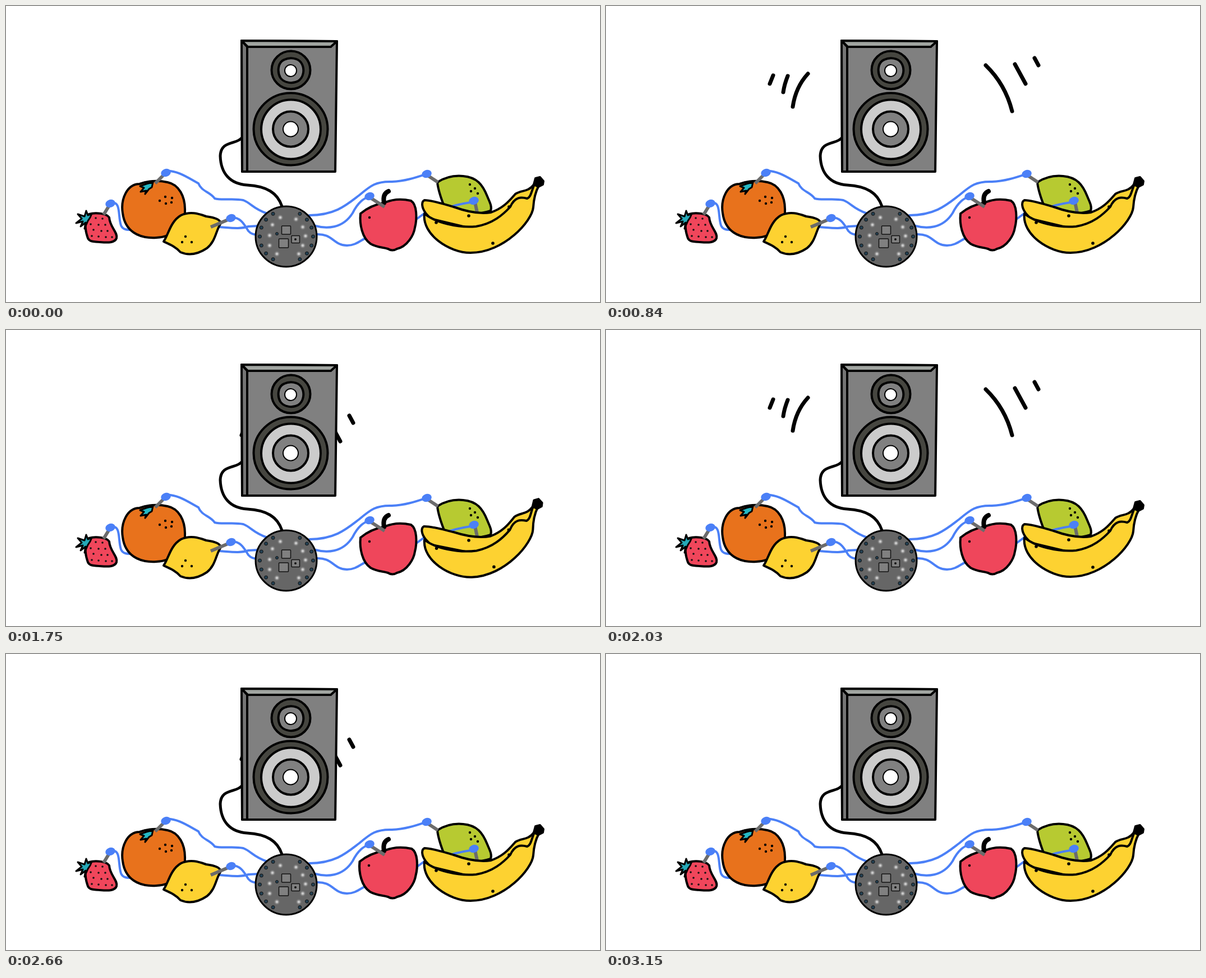
An HTML page that plays this animation: 1059 px wide and 529 px high, repeating every 3290 ms.

```html
<!DOCTYPE html>
<html lang="en">
<head>
<meta charset="utf-8">
<title>Fruit speaker</title>
<style>
html, body { margin: 0; width: 100%; height: 100%; overflow: hidden; background: #fff; }
svg { display: block; width: 100%; height: 100%; }
.ink { stroke: #000; stroke-width: 4; stroke-linejoin: round; stroke-linecap: round; }
.wave { fill: none; stroke: #000; stroke-width: 7; stroke-linecap: round; }
.wire { fill: none; stroke: #4b80f7; stroke-width: 4; stroke-linecap: round; }
.clip { stroke: #6b6b6b; stroke-width: 6; }
.knob { fill: #4b80f7; }
.fruit { transform-box: fill-box; transform-origin: center; }
</style>
</head>
<body>
<svg viewBox="0 0 1059 529">
  <defs>
    <radialGradient id="glow">
      <stop offset=".2" stop-color="#d0d0d0"/>
      <stop offset="1" stop-color="#666" stop-opacity="0"/>
    </radialGradient>
  </defs>

  <path class="wave" id="waveL" d="M360 121Q338 145 333 180M324 125Q318 140 316 154M298 124L292 139"/>
  <path class="wave" id="waveR" d="M677 106Q712 140 724 188M729 104L748 139M764 93L771 106"/>

  <path d="M420 236C410 248 383 240 382 268C383 300 400 318 430 320C465 322 484 334 492 358" fill="none" class="ink" style="stroke-width:5"/>

  <!-- speaker -->
  <g class="ink">
    <path d="M420 62L590 63L587 296L421 296Z" fill="#808080"/>
    <path d="M420 62L430 73L430 296L421 296Z" fill="#757575"/>
    <path d="M420 62L590 63L579 73L431 73Z" fill="#a1a5a1"/>
    <ellipse cx="508" cy="114.5" rx="34.5" ry="34" fill="#464640"/>
    <path d="M496 96C506 91 520 93 526 101C534 113 530 128 521 134C510 140 495 137 489 128C483 117 485 100 496 96Z" fill="#808080"/>
    <circle cx="507.500" cy="115.500" r="10.500" fill="#fff" stroke-width="2" style="stroke-width:2"/>
    <ellipse cx="507.500" cy="220" rx="66" ry="64.500" fill="#464640"/>
    <circle cx="508" cy="220.500" r="53" fill="#cbcbcb"/>
    <circle cx="507.500" cy="220" r="31.500" fill="#808080"/>
    <circle cx="507.500" cy="220" r="13.500" fill="#fff" style="stroke-width:2"/>
  </g>

  <!-- wires -->
  <g class="wire">
    <path d="M285 295C305 293 326 308 343 317C349 332 364 332 372 344C386 348 405 343 423 347C438 353 440 362 466 371"/>
    <path d="M186 352C206 347 199 375 205 392C209 402 218 400 240 400M360 394C395 395 415 400 432 394L450 393"/>
    <path d="M401 378C419 377 425 391 432 402Q438 409 450 409"/>
    <path d="M541 374C588 374 609 354 630 338C650 321 660 313 688 314C712 313 732 306 750 300"/>
    <path d="M552 393C570 398 600 399 618 370C628 350 638 344 648 340"/>
    <path d="M553 408C582 406 584 428 608 428C626 428 634 416 650 411L733 380L748 369"/>
  </g>

  <!-- board -->
  <ellipse class="ink" cx="499.500" cy="412" rx="54.500" ry="54" fill="#666" style="stroke-width:3"/>
  <g id="board"></g>
  <g fill="#808080" stroke="#111" stroke-width="1.500">
    <rect x="491.500" y="393" width="16" height="15" rx="1"/>
    <rect x="509" y="410.500" width="14.500" height="13" rx="1"/>
    <rect x="486.500" y="416" width="17" height="16" rx="1"/>
  </g>

  <!-- orange -->
  <path class="ink" fill="#e8721c" d="M238 318C216 318 204 345 208 370C212 402 236 416 268 414C300 412 320 395 319 367C320 340 308 319 288 315C270 311 252 313 238 318Z"/>
  <path class="ink" fill="#25b9c4" style="stroke-width:3" d="M262 315L250 318L239 322L246 325L240 332L250 330L248 336L255 327L260 324Z"/>

  <!-- strawberry -->
  <path class="ink" fill="#f0465b" d="M148 372C160 368 180 371 184 378C185 395 200 405 197 415C194 424 180 423 168 422C153 421 147 421 145 412C141 400 139 382 148 372Z"/>
  <path class="ink" fill="#25a9b8" style="stroke-width:3" d="M153 371L146 374L143 366L140 376L128 372L135 380L125 388L137 385L133 394L142 387L140 398L146 384L150 378Z"/>

  <!-- lemon -->
  <g class="fruit" id="lemon">
    <path class="ink" fill="#fdd231" d="M281 421C290 408 293 385 312 374C330 366 345 372 357 376C372 378 385 382 382 390C374 402 374 420 358 433C340 445 325 446 311 440C302 430 292 426 281 421Z"/>
  </g>

  <!-- apple -->
  <g class="fruit" id="apple">
    <path class="ink" fill="#ef465b" d="M676 351C660 354 645 360 632 371C630 390 635 415 650 425C662 432 672 431 681 434C687 438 692 437 697 434C715 430 727 410 729 396C733 380 733 355 722 348C705 344 690 345 676 351Z"/>
  </g>
  <path class="ink" fill="none" style="stroke-width:8" d="M674 352C672 341 675 334 682 331"/>

  <!-- lime -->
  <path class="ink" fill="#b7ca31" d="M769 315C780 308 795 302 815 304C840 306 850 320 858 340C862 350 867 358 864 366C840 374 800 375 782 360C774 340 770 325 769 315Z"/>
  <path class="wire" d="M780 363Q800 355 834 350"/>
  <path class="clip" d="M836 350L841 374"/>

  <!-- bananas -->
  <g class="fruit" id="banana">
    <g class="ink" fill="#fdd231">
      <path d="M746 347C760 347 780 354 798 359C820 367 845 372 864 369C888 361 899 346 908 336C920 328 930 334 942 318L941 345L899 378L840 400L757 380L748 370C741 360 740 350 746 347Z"/>
      <path d="M746 371C765 387 805 397 838 394C868 389 886 373 899 359C907 341 918 341 929 344C936 342 937 330 942 319L950 321C944 332 941 343 940 360C938 384 888 441 828 441C790 441 741 408 746 371Z"/>
      <path fill="#000" d="M944 308L952 306L958 313L957 319L949 323L941 319Z"/>
    </g>
  </g>

  <g class="clip">
    <path d="M283 300L266 317M185 355L174 373M398 381L365 395M752 303L770 315M650 343L675 359"/>
  </g>
  <g id="knobs"></g>
</svg>

<script>
const $ = id => document.getElementById(id);

function add(parent, name, attrs) {
  const el = document.createElementNS('http://www.w3.org/2000/svg', name);
  for (const key in attrs) el.setAttribute(key, attrs[key]);
  parent.append(el);
}
function dots(parent, points, r, fill, stroke = 'none') {
  for (let i = 0; i < points.length; i += 2)
    add(parent, 'circle', { cx: points[i], cy: points[i + 1], r, fill, stroke });
}

const svg = document.querySelector('svg');
dots($('board'), [489, 378, 517, 381, 475, 391, 529, 395, 470, 410, 534, 411, 470, 428, 529, 428, 483, 443, 522, 443], 6, 'url(#glow)');
// contact ring, open at the top and bottom
for (const side of [-1, 1])
  for (let i = -3; i <= 3; i++) {
    const a = i * 0.348;
    dots($('board'), [500 + side * 47.5 * Math.cos(a), 412 + 47 * Math.sin(a)], 3, '#234052', '#111');
  }
dots($('board'), [483, 407], 2.5, '#234052', '#111');
dots(svg, [516, 417], 2, '#111');
dots(svg, [284, 341, 296, 343, 274, 348, 285, 353, 295, 351], 2.2, '#000');
dots(svg, [827, 319, 836, 326, 829, 331, 841, 335], 2.2, '#000');
dots(svg, [160, 379, 172, 380, 151, 390, 165, 391, 177, 391, 156, 400, 170, 402, 181, 402, 153, 411, 165, 412, 178, 413, 189, 413], 1.8, '#111');
dots($('lemon'), [320, 412, 314, 422, 331, 422], 2.2, '#000');
dots($('apple'), [648, 378], 2.2, '#000');
dots($('banana'), [767, 387, 825, 375, 868, 424, 897, 359], 2.8, '#000');
for (const [x, y] of [[285, 298], [186, 353], [401, 379], [750, 300], [648, 340], [834, 348]])
  add($('knobs'), 'ellipse', { class: 'knob', cx: x, cy: y, rx: 9, ry: 7, transform: `rotate(-20 ${x} ${y})` });

const STEP = 70, LOOP = 3290;
// each pose: x scale, y scale, degrees
const shortJiggle = [[1, .97, 0], [.98, 1.1, -1], [1.03, 1, 0], [1.01, .97, 1.5], [1, 1.02, -1]];
const longJiggle = [[1, .965, 0], [1, 1.04, 1], [.99, 1.09, 0], [1.01, 1, -1], [1, 1, -2.2], [1, .98, 0], [1, 1.02, 1.5], [1, 1.03, 0]];
const beats = [
  { id: 'lemon', start: 490, wave: 560, poses: shortJiggle },
  { id: 'banana', start: 1470, wave: 1750, poses: longJiggle },
  { id: 'apple', start: 2520, wave: 2660, poses: shortJiggle }
];

function draw(now) {
  const t = Math.floor(now % LOOP / STEP) * STEP;
  let away = 1, alpha = 0;
  for (const { id, start, wave, poses } of beats) {
    const [sx, sy, turn] = poses[(t - start) / STEP] || [1, 1, 0];
    $(id).style.transform = `rotate(${turn}deg) scale(${sx}, ${sy})`;
    const age = t - wave;
    if (age >= 0 && age < 490) {
      away = Math.max(0, 1 - age / 280);
      alpha = Math.min(1, (490 - age) / 210);
    }
  }
  $('waveL').setAttribute('transform', `translate(${128 * away} ${49 * away})`);
  $('waveR').setAttribute('transform', `translate(${-152 * away} ${60 * away})`);
  $('waveL').style.opacity = $('waveR').style.opacity = alpha;
}

const begin = performance.now();
function loop() {
  draw(performance.now() - begin);
  requestAnimationFrame(loop);
}
loop();
</script>
</body>
</html>
```
